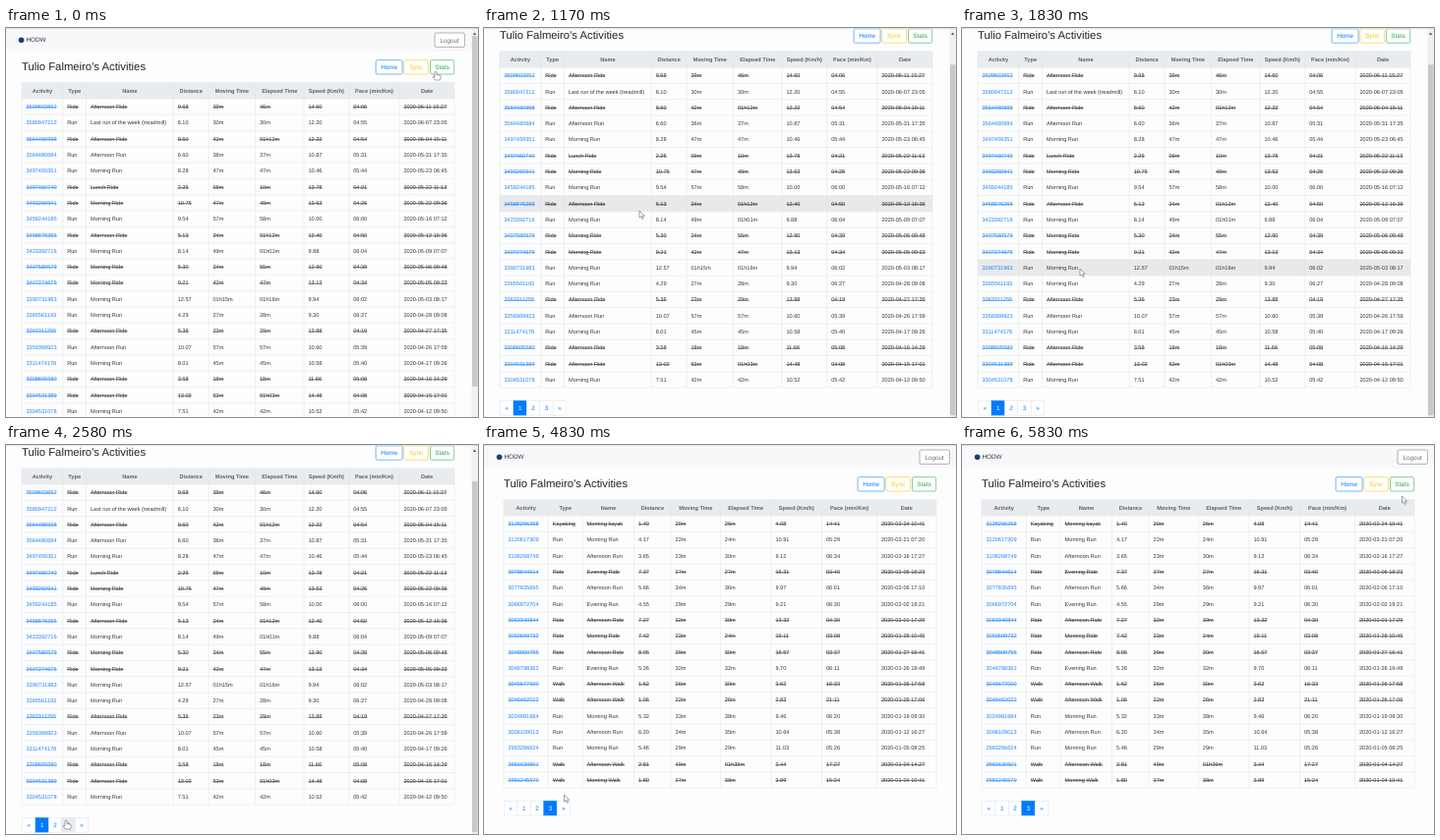
Animation, 480 px wide and 396 px high, one loop 6.01 s. Source, as an HTML page:

```html
<!DOCTYPE html>
<html lang="en">
<head>
<meta charset="utf-8">
<title>Activities</title>
<style>
html, body { margin: 0; width: 100%; height: 100%; overflow: hidden; background: #fdfdfe; }
svg { display: block; width: 480px; height: 396px; }
text { font: 5.61px "Liberation Sans", Arial, sans-serif; fill: #34373c; text-rendering: geometricPrecision; white-space: pre; }
.head { font-weight: bold; fill: #5a6067; text-anchor: middle; }
.title { font-size: 11.3px; fill: #212529; }
.ui { font-size: 6.35px; }
.mid { text-anchor: middle; }
.struck { text-decoration: line-through; }
.status { font-size: 6.9px; fill: #444; }
.line { stroke: #dee2e6; stroke-width: .5; fill: none; }
</style>
</head>
<body>
<svg id="stage" viewBox="0 0 480 396"></svg>
<script>
const LOOP = 6010, ROW = 16.3, TOP = 55.6, BLUE = '#007bff';
const HEADS = ['Activity', 'Type', 'Name', 'Distance', 'Moving Time', 'Elapsed Time', 'Speed (Km/h)', 'Pace (min/Km)', 'Date'];

const first = {
  cols: [16, 57.8, 81.6, 170.3, 206, 253.6, 303, 348.8, 400, 456],
  logout: 436, current: 1,
  rows: `3509603652|Ride|Afternoon Ride|9.68|39m|46m|14.60|04:06|2020-06-11 15:27
3580947212|Run|Last run of the week (treadmill)|6.10|30m|30m|12.20|04:55|2020-06-07 23:05
3564480998|Ride|Afternoon Ride|8.60|42m|01h12m|12.22|04:54|2020-06-04 15:11
3564480684|Run|Afternoon Run|6.60|36m|37m|10.87|05:31|2020-05-31 17:35
3497459351|Run|Morning Run|8.28|47m|47m|10.46|05:44|2020-05-23 06:45
3497460740|Ride|Lunch Ride|2.25|09m|10m|13.78|04:21|2020-05-22 11:13
3493260941|Ride|Morning Ride|10.75|47m|49m|13.53|04:26|2020-05-22 09:36
3459244185|Run|Morning Run|9.54|57m|58m|10.00|06:00|2020-05-16 07:12
3458876265|Ride|Afternoon Ride|5.13|24m|01h12m|12.40|04:50|2020-05-12 16:36
3423392716|Run|Morning Run|8.14|49m|01h01m|9.88|06:04|2020-05-09 07:07
3407580579|Ride|Morning Ride|5.30|24m|55m|12.90|04:39|2020-05-06 09:48
3407274675|Ride|Morning Ride|9.21|42m|47m|13.13|04:34|2020-05-05 09:23
3390731983|Run|Morning Run|12.57|01h15m|01h16m|9.94|06:02|2020-05-03 08:17
3365561193|Run|Morning Run|4.29|27m|28m|9.30|06:27|2020-04-28 09:08
3363311255|Ride|Afternoon Ride|5.36|23m|29m|13.88|04:19|2020-04-27 17:35
3359369923|Run|Afternoon Run|10.07|57m|57m|10.60|05:39|2020-04-26 17:59
3311474178|Run|Morning Run|8.01|45m|45m|10.58|05:40|2020-04-17 09:26
3308605580|Ride|Afternoon Ride|3.58|18m|18m|11.66|05:08|2020-04-16 14:29
3304531389|Ride|Afternoon Ride|13.02|53m|01h03m|14.48|04:08|2020-04-15 17:01
3304531078|Run|Morning Run|7.51|42m|42m|10.52|05:42|2020-04-12 09:50`
};
const last = {
  cols: [20, 65.4, 100.2, 152.6, 190.2, 240.4, 292, 343.6, 399.6, 460],
  logout: 443, current: 3,
  rows: `3128296268|Kayaking|Morning kayak|1.40|20m|26m|4.08|14:41|2020-02-24 10:41
3120617309|Run|Morning Run|4.17|22m|24m|10.91|05:29|2020-02-21 07:20
3106268749|Run|Afternoon Run|3.65|23m|30m|9.12|06:34|2020-02-16 17:27
3078844614|Ride|Evening Ride|7.37|27m|27m|16.31|03:40|2020-02-06 18:23
3077835695|Run|Afternoon Run|5.66|34m|36m|9.97|06:01|2020-02-06 17:10
3066972704|Run|Evening Run|4.55|29m|29m|9.21|06:30|2020-02-02 19:21
3063340844|Ride|Afternoon Ride|7.27|32m|39m|13.32|04:30|2020-02-01 17:29
3050699732|Ride|Morning Ride|7.42|23m|24m|19.11|03:08|2020-01-28 10:45
3048900755|Ride|Afternoon Ride|8.05|29m|30m|16.57|03:37|2020-01-27 16:41
3046798362|Run|Evening Run|5.26|32m|32m|9.70|06:11|2020-01-26 19:49
3045677000|Walk|Afternoon Walk|1.62|26m|30m|3.62|16:33|2020-01-26 17:58
3046462022|Walk|Afternoon Walk|1.06|22m|26m|2.83|21:11|2020-01-26 17:06
3024981684|Run|Morning Run|5.32|33m|38m|9.46|06:20|2020-01-19 09:30
3006109013|Run|Afternoon Run|6.20|34m|35m|10.64|05:38|2020-01-12 16:27
2983266624|Run|Morning Run|5.46|29m|29m|11.03|05:26|2020-01-05 08:25
2981630501|Walk|Afternoon Walk|2.81|49m|01h39m|3.44|17:27|2020-01-04 14:27
2981245570|Walk|Morning Walk|1.80|27m|38m|3.89|15:24|2020-01-04 10:41`
};

const rect = (x, y, w, h, more = '') => `<rect x="${x}" y="${y}" width="${w}" height="${h}" ${more}/>`;
const text = (x, y, str, cls = '', color = '') =>
  `<text x="${x}" y="${y}" class="${cls}" ${color && `style="fill:${color}"`}>${str}</text>`;
const button = (x, y, w, label, color) =>
  rect(x, y, w, 14.4, `rx="1.6" fill="#fefefe" stroke="${color}" stroke-width=".55"`) +
  text(x + w / 2, y + 9.5, label, 'ui mid', color);

function pager(x, y, current) {
  const w = 13.4;
  return ['«', '1', '2', '3', '»'].map((label, i) => {
    const on = i === current;
    return rect(x + i * w, y, w, 14.6, `class="line" style="fill:${on ? BLUE : '#fff'};stroke:${on ? BLUE : ''}" id="p${current}${i}"`) +
      text(x + (i + .5) * w, y + 9.5, label, 'ui mid', on ? '#fff' : BLUE);
  }).join('');
}

function page({ cols, logout, current, rows }) {
  const left = cols[0], right = cols[9], width = right - left;
  const data = rows.split('\n').map(r => r.split('|'));
  const bottom = TOP + ROW * (data.length + 1);
  let out = rect(0, 0, 480, 24, 'fill="#f8f8fb"') +
    '<circle cx="15.6" cy="12.2" r="2.8" fill="#1c3f6e"/>' +
    text(20.4, 14.4, 'HODW', 'ui') +
    button(logout, 5, 30.4, 'Logout', '#6c757d') +
    text(left, 43, "Tulio Falmeiro's Activities", 'title') +
    button(right - 79.9, 32.6, 27, 'Home', BLUE) +
    button(right - 51.2, 32.6, 24.6, 'Sync', '#ffc107') +
    button(right - 24.5, 32.6, 24.2, 'Stats', '#28a745') +
    rect(left, TOP, width, ROW, 'fill="#e9ecef"') +
    rect(left, 0, width, ROW, `id="hover${current}" fill="#e9e9eb"`);
  HEADS.forEach((h, i) => out += text((cols[i] + cols[i + 1]) / 2, 65.7, h, 'head'));
  data.forEach((row, r) => row.forEach((cell, c) => out +=
    text(cols[c] + 4.4, 82.1 + r * ROW, cell, row[1] === 'Run' ? '' : 'struck', c ? '' : '#1a86ff')));
  let grid = '';
  for (let i = 0; i <= data.length + 1; i++) grid += `M${left} ${TOP + i * ROW}H${right}`;
  cols.forEach(x => grid += `M${x} ${TOP}V${bottom}`);
  return `<g id="page${current}">${out}<path class="line" d="${grid}"/>${pager(left + .6, bottom + 13.4, current)}</g>`;
}

const stage = document.getElementById('stage');
stage.innerHTML = page(first) + page(last) +
  '<g id="bar">' + rect(473.5, 0, 6.5, 396, 'fill="#f0f0f2"') +
  '<path d="M475 7L476.6 4.6L478.2 7Z" fill="#555"/>' +
  rect(474, 0, 5.6, 357, 'id="thumb" fill="#c8c8cb"') + '</g>' +
  rect(0, 0, 480, .7, 'fill="#dcdce0"') +
  '<g id="status">' + rect(320.5, 389.5, 170, 10, 'rx="1.2" fill="#dadce0" stroke="#bbb" stroke-width=".5"') +
  text(324, 397.2, 'Waiting for lit-basin-49007.herokuapp.com...', 'status') + '</g>' +
  '<g id="cursor" fill="#fff" stroke="#666" stroke-width=".6" stroke-linejoin="round">' +
  '<path id="arrow" d="M0 0V7.2L1.7 5.7L2.9 8.4L4.1 7.9L3 5.3H5.2Z"/>' +
  '<path id="hand" d="M-1 .8Q0-.6 1 .8V3.5L4.6 4.2Q5.4 4.5 5.2 6L4.5 9H-.5L-3 5.8Q-2.6 4.6-1 6Z"/></g>';

const el = id => document.getElementById(id);
const show = (id, on) => el(id).setAttribute('display', on ? 'inline' : 'none');

// time, x, y of the pointer tip; held until the next entry
const moves = [
  [0, 437, 44], [580, 400, 76], [830, 260, 135], [1000, 170, 177], [1170, 158, 186],
  [1420, 142.5, 191.5], [1580, 134, 212], [1830, 120, 245], [2000, 102, 285], [2250, 82, 330],
  [2420, 68, 364], [2580, 61, 382], [4170, 63, 379], [4420, 69, 371], [4580, 76, 363],
  [4830, 81.5, 356], [5000, 170, 262], [5170, 310, 142], [5420, 400, 94], [5580, 437, 64],
  [5830, 447.5, 52]
];

function draw(t) {
  const [, x, y] = moves.filter(m => m[0] <= t).pop();
  const isLast = t >= 3000, scroll = t >= 1170 && !isLast ? 31.8 : 0;
  const hand = t < 580 || (t >= 2580 && t < 4170);
  const now = isLast ? 3 : 1, count = isLast ? 17 : 20;
  const row = Math.floor((y + scroll - TOP) / ROW) - 1;

  show('page1', !isLast);
  show('page3', isLast);
  show('bar', !isLast);
  show('status', t >= 2830 && t < 3580);
  show('hand', hand);
  show('arrow', !hand);
  show('hover' + now, row >= 0 && row < count);
  el('hover' + now).setAttribute('y', TOP + (row + 1) * ROW);
  el('page1').setAttribute('transform', `translate(0 ${-scroll})`);
  el('thumb').setAttribute('y', 8 + scroll * .92);
  el('p13').style.fill = hand && scroll ? '#e9ecef' : '#fff';
  el('cursor').setAttribute('transform', `translate(${x} ${y})`);
}

const start = performance.now();
function tick() {
  draw((performance.now() - start) % LOOP);
  requestAnimationFrame(tick);
}
tick();
</script>
</body>
</html>
```
